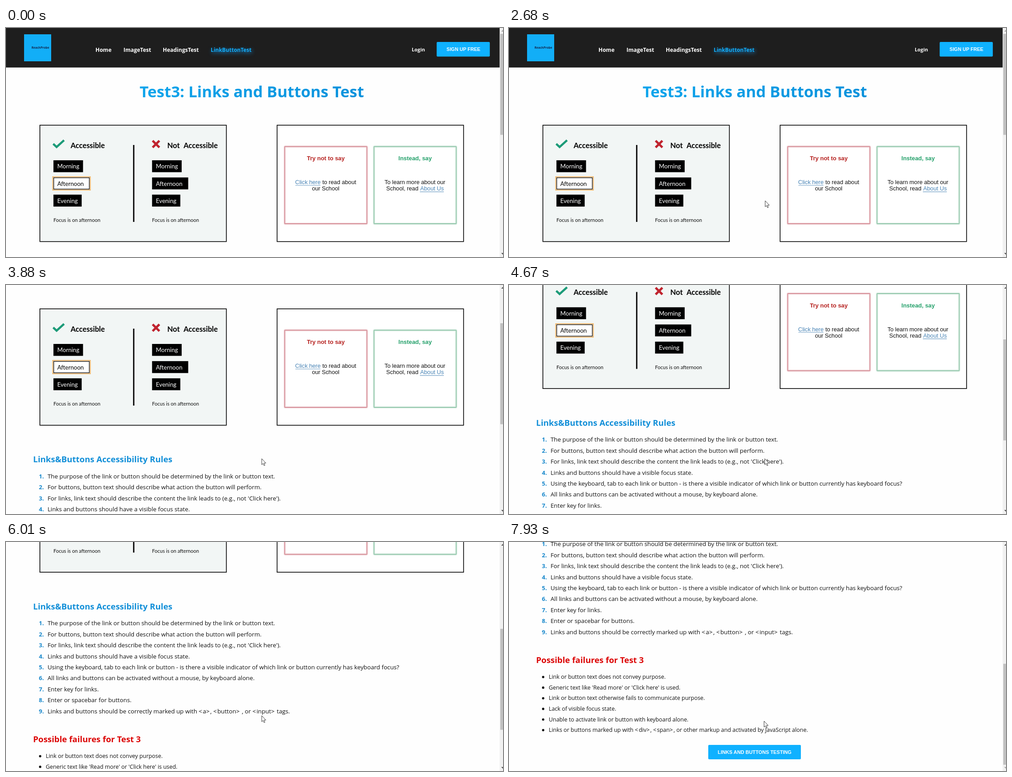
These frames come from a looping animation (1100 px wide and 509 px high, 8 s). An HTML page:

```html
<!DOCTYPE html>
<html lang="en">
<head>
<meta charset="utf-8">
<title>Links and Buttons Test</title>
<style>
  html, body { margin: 0; width: 100%; height: 100%; overflow: hidden; background: #fefefe; }
  svg { display: block; width: 1100px; height: 509px; }
  text { font-family: "Open Sans", "Noto Sans", sans-serif; }
  .b { font-weight: 700; }
  .arial text, text.arial { font-family: "Liberation Sans", Arial, sans-serif; }
  .hand text { font-family: Lato, "Open Sans", sans-serif; }
  .mid { text-anchor: middle; }
  .end { text-anchor: end; }
  .glow { filter: drop-shadow(2px 3px 4px rgba(18, 150, 240, .8)); }
</style>
</head>
<body>
<svg viewBox="0 0 1100 509">
  <defs>
    <linearGradient id="sky">
      <stop offset="0" stop-color="#0ea5ec"/>
      <stop offset="1" stop-color="#0b92dc"/>
    </linearGradient>
  </defs>
  <g id="page"></g>
  <rect x="1092.6" width="7.4" height="509" fill="#f1f1f1"/>
  <rect id="thumb" x="1094" width="6" height="224.5" fill="#c1c1c1"/>
  <path id="up" d="M1096 8L1100 4V8Z"/>
  <path id="down" d="M1096 500L1100 504V500Z"/>
  <path id="cursor" d="M0 0V13.4L3 10.7 5.1 15.5 7.1 14.6 5.1 9.9H9.2Z"
        fill="#fff" stroke="#222" stroke-width=".9" stroke-linejoin="round"/>
</svg>
<script>
const LOOP = 8000;
const $ = id => document.getElementById(id);
const esc = s => s.replace(/&/g, '&amp;').replace(/</g, '&lt;').replace(/>/g, '&gt;');

const text = (x, y, str, size, fill = '#000', cls = '') =>
  `<text x="${x}" y="${y}" font-size="${size}" fill="${fill}" class="${cls}">${esc(str)}</text>`;
const rect = (x, y, w, h, fill, extra = '') =>
  `<rect x="${x}" y="${y}" width="${w}" height="${h}" fill="${fill}" ${extra}/>`;
const line = (d, color, width) =>
  `<path d="${d}" fill="none" stroke="${color}" stroke-width="${width}"/>`;
// widens the angle brackets of tag names
const tags = (markup, gap) =>
  markup.replace(/&[lg]t;/g, m => `<tspan letter-spacing="${gap}">${m}</tspan>`);

function header() {
  const nav = [[198, 'Home'], [260, 'ImageTest'], [347, 'HeadingsTest']];
  return rect(0, 0, 1093, 87.8, '#1e1e1e') +
    rect(40, 14, 60, 60, '#12aef7') +
    text(76, 46, 'ReachProbe', 6.6, '#14284f', 'b mid') +
    nav.map(([x, s]) => text(x, 53, s, 12, '#fff', 'b')).join('') +
    text(453, 53, 'LinkButtonTest', 11.8, '#12aefc', 'b glow') +
    text(898, 52, 'Login', 10.8, '#fff', 'b') +
    rect(953.2, 31, 117.6, 32.6, '#0fb1ff', 'rx="2"') +
    text(1012.5, 51.3, 'SIGN UP FREE', 10.65, '#fff', 'b mid arial');
}

function focusColumn(x, focused) {
  const items = [['Morning', 65.5], ['Afternoon', 80], ['Evening', 62.5]];
  return items.map(([label, w], i) => {
    const y = 294 + i * 38.2;
    const on = focused && i === 1;
    const box = on
      ? rect(x - 1.6, y - 1.6, w + 3.2, 29.7, '#fff', 'stroke="#eda94e" stroke-width="1.6"') +
        rect(x + .6, y + .6, w - 1.2, 25.3, '#fff', 'stroke="#111" stroke-width="1.4"')
      : rect(x, y, w, 26.5, '#000');
    return box + text(x + 8.5, y + 18.4, label, 13.1, on ? '#000' : '#fff');
  }).join('') + text(x, 431, 'Focus is on afternoon', 11, '#111');
}

function focusCard() {
  return '<g class="hand">' +
    rect(75, 216, 412.7, 258.7, '#f2f6f5', 'stroke="#000" stroke-width="1.6"') +
    line('M104.5 257.5L112 264.5 128.5 249.5', '#1c9b78', 4.6) +
    line('M324.5 250.5L339.5 265.5M339.5 250.5L324.5 265.5', '#c0242f', 5) +
    text(143, 266.5, 'Accessible', 16.3, '#000', 'b') +
    text(357, 266.5, 'Not', 16.3, '#000', 'b') +
    text(393, 266.5, 'Accessible', 16.3, '#000', 'b') +
    line('M282.7 260V431', '#0a0a0a', 3) +
    focusColumn(105, true) + focusColumn(323.3, false) + '</g>';
}

function sayBox(x, edge, title, color) {
  const shape = 'rx="1" stroke="' + edge + '"';
  return rect(x, 263.5, 182, 171.5, 'none', shape + ' stroke-width="4.5" opacity=".3"') +
    rect(x, 263.5, 182, 171.5, 'none', shape + ' stroke-width="1.8"') +
    text(x + 91, 294, title, 12.9, color, 'b mid');
}

function sayCard() {
  const size = 12.7, link = '#4682b4';
  return '<g class="arial">' +
    rect(600, 216, 412.7, 258.7, '#fff', 'stroke="#000" stroke-width="1.6"') +
    sayBox(616.8, '#d68f98', 'Try not to say', '#b5201e') +
    sayBox(814.5, '#93c7ab', 'Instead, say', '#24a06a') +
    text(640, 347, 'Click here', size, link) +
    text(775, 347, 'to read about', size, '#111', 'end') +
    text(707.5, 361.3, 'our School', size, '#111', 'mid') +
    text(905, 347, 'To learn more about our', size, '#111', 'mid') +
    text(841.5, 361.3, 'School, read', size, '#111') +
    text(969, 361.3, 'About Us', size, link, 'end') +
    line('M640.5 349.8H696M916 364.1H969', '#6c9cc4', 1.1) + '</g>';
}

function rules() {
  const items = [
    'The purpose of the link or button should be determined by the link or button text.',
    'For buttons, button text should describe what action the button will perform.',
    "For links, link text should describe the content the link leads to (e.g., not 'Click here').",
    'Links and buttons should have a visible focus state.',
    'Using the keyboard, tab to each link or button - is there a visible indicator of which link or button currently has keyboard focus?',
    'All links and buttons can be activated without a mouse, by keyboard alone.',
    'Enter key for links.',
    'Enter or spacebar for buttons.',
    'Links and buttons should be correctly marked up with <a>, <button> , or <input> tags.'
  ];
  return text(60, 557, 'Links&Buttons Accessibility Rules', 18.4, '#128fd8', 'b') +
    items.map((s, i) => {
      const y = 592.8 + i * 24.43;
      return text(84, y, i + 1 + '.', 13, '#1787cb', 'b end') +
        tags(text(92, y, s, 13.22, '#111'), 1.5);
    }).join('');
}

function failures() {
  const items = [
    'Link or button text does not convey purpose.',
    "Generic text like 'Read more' or 'Click here' is used.",
    'Link or button text otherwise fails to communicate purpose.',
    'Lack of visible focus state.',
    'Unable to activate link or button with keyboard alone.',
    'Links or buttons marked up with <div>, <span>, or other markup and activated by JavaScript alone.'
  ];
  return text(60, 852, 'Possible failures for Test 3', 18.4, '#dc0505', 'b') +
    items.map((s, i) => {
      const y = 887.6 + i * 23.6;
      return `<circle cx="75.6" cy="${y - 4}" r="2.6" fill="#111"/>` +
        tags(text(88, y, s, 12.4, '#111'), 1.5);
    }).join('');
}

$('page').innerHTML = header() +
  text(544, 153.8, 'Test3: Links and Buttons Test', 34.35, 'url(#sky)', 'b mid') +
  focusCard() + sayCard() + rules() + failures() +
  rect(441, 1034.5, 205, 32, '#0fb1ff', 'rx="2"') +
  text(543.7, 1054.6, 'LINKS AND BUTTONS TESTING', 10.81, '#fff', 'b mid arial');

// wheel notches: each scrolls one step, the last reaches the page end
const NOTCH = 81.5, BOTTOM = 583.5;
const notches = [2880, 3880, 4670, 5350, 6010, 6670, 7200, 7400];
const scrollAt = t => Math.min(BOTTOM, NOTCH * notches.filter(n => t >= n).length);

// small pointer moves: time, x, y
const nudges = [
  [1660, 570.5, 381.5], [1730, 570, 381],
  [2200, 569.3, 381.5], [2310, 568.5, 382], [2420, 567.7, 382.5], [2530, 567, 383],
  [2680, 567, 384], [3540, 566.5, 385], [3610, 566, 386], [7930, 564.5, 398]
];
function cursorAt(t) {
  if (t < 920) return null;
  const last = nudges.filter(n => t >= n[0]).pop();
  if (last) return last.slice(1);
  const step = Math.min(7, Math.floor((t - 920) / (540 / 7) + 1e-6));
  const rest = (1 - step / 7) ** 2;
  return [571 + 432 * rest, 382 + 115 * rest];
}

function draw(t) {
  const y = scrollAt(t), pos = cursorAt(t);
  $('page').setAttribute('transform', `translate(0 ${-y})`);
  $('thumb').setAttribute('y', 13 + y * .4415);
  $('up').setAttribute('fill', y > 0 ? '#505050' : '#a3a3a3');
  $('down').setAttribute('fill', y < BOTTOM ? '#505050' : '#a3a3a3');
  $('cursor').setAttribute('visibility', pos ? 'visible' : 'hidden');
  if (pos) $('cursor').setAttribute('transform', `translate(${pos})`);
}

const start = performance.now();
function tick() {
  draw((performance.now() - start) % LOOP);
  requestAnimationFrame(tick);
}
tick();
</script>
</body>
</html>
```
